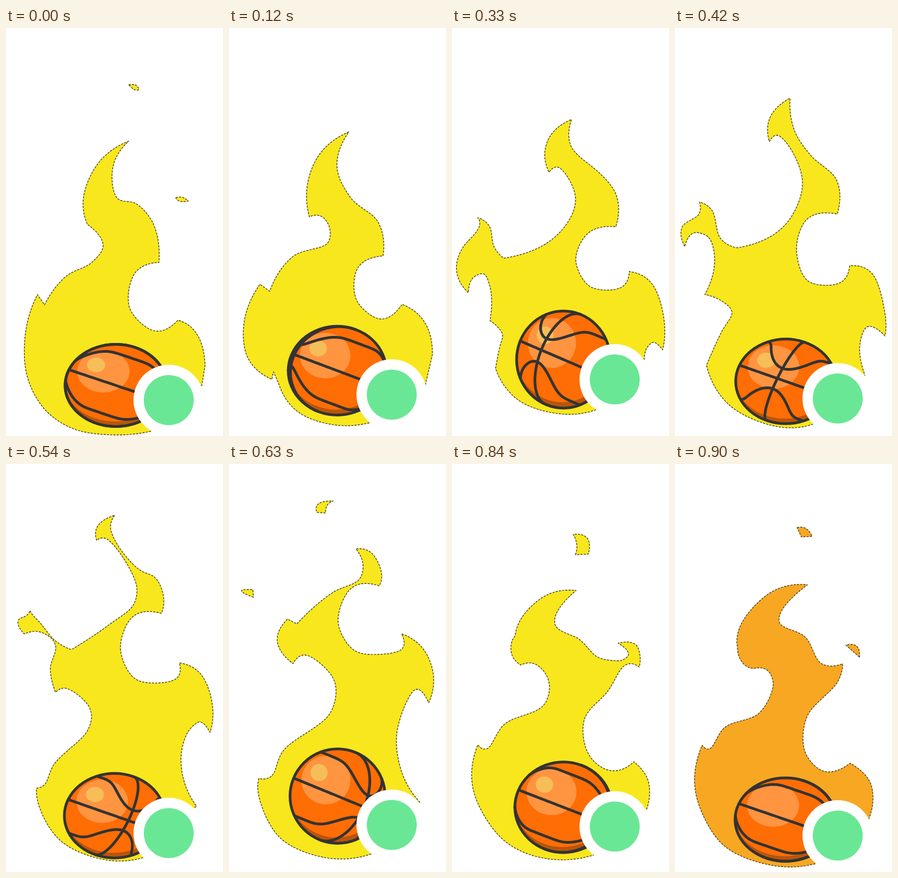
An HTML page with a canvas that plays this animation: 400 px wide and 750 px high, repeating every 0.93 s.

```html
<!DOCTYPE html>
<html lang="en">
<head>
<meta charset="utf-8">
<title>Flaming basketball</title>
<style>
  html, body { margin: 0; width: 100%; height: 100%; overflow: hidden; background: #fff; }
  canvas { display: block; }
</style>
</head>
<body>
<canvas id="stage" width="400" height="750"></canvas>
<script>
const LOOP = 930, STEP = 30, BOUNCE = LOOP / 2, SAMPLES = 64;
const { sin, cos, PI, hypot, sqrt, max } = Math;
const ctx = document.getElementById('stage').getContext('2d');
const mix = (a, b, u) => a + (b - a) * u;

// Key poses of the flame, clockwise from the disc. "/" is a sharp corner,
// an empty run a corner not yet grown, "( )" a part that tears off.
// drift: [x, y, final scale, lifetime] of the loose parts after the pose.
const poses = [
  { at: 0, drift: [0, -4, 0, 75],
    drops: ['226 104 / 238 104 / 245 113 235 113 / 226 104', '313 312 / 324 311 336 318 / 319 318 313 312'],
    flame: `268 741 / 200 748 125 737 72 702 / / / 39 640 36 560 58 490 / 71 509 /
      110 457 158 431 179 400 150 361 / 143 310 172 246 226 208 /
      197 256 205 313 240 323 272 361 282 431 / 238 450 228 515 275 557 317 537 /
      350 560 367 620 / 361 657 /` },
  { at: 120,
    flame: `258 726 / 190 729 125 704 92 655 / 82 632 / 79 646 / 35 607 28 540 57 471 / 75 484 /
      118 420 182 395 185 366 170 346 148 347 / 145 285 170 228 221 191 /
      199 255 225 313 275 357 284 419 / 238 440 235 500 280 535 319 508 /
      360 540 375 600 / 362 656 /` },
  { at: 270,
    flame: `268 686 / 200 694 135 677 95 630 / 80 570 / 67 510 55 493 42 507 38 543 /
      8 500 14 437 54 384 49 368 / 69 383 73 410 82 436 /
      190 397 226 345 200 295 182 303 / 171 262 185 222 226 194 /
      220 240 280 282 307 330 304 381 / 255 395 231 440 260 482 318 482 330 455 /
      370 480 394 545 389 609 / 372 587 357 594 /` },
  { at: 420,
    flame: `258 727 / 190 733 100 693 58 620 / 85 560 105 522 88 503 55 490 /
      73 430 62 385 34 377 18 402 / 13 366 44 342 45 320 / 68 335 84 387 115 404 /
      200 365 235 290 215 225 188 197 174 209 / 175 165 212 129 /
      220 188 250 234 298 280 299 342 / 245 350 224 405 245 465 305 468 322 437 /
      362 450 387 525 387 566 / 355 549 341 580 350 638 /` },
  { at: 630, drift: [4, -30, 0, 90],
    flame: `262 717 / 180 724 95 688 56 615 55 578 / 78 574 100 527 187 457 194 398 140 351 118 367 /
      89 325 108 285 ( 45 245 / 23 233 44 231 / 45 245 ) 108 285 125 294 /
      190 237 240 212 247 185 234 156 ( 178 90 162 89 / 163 75 192 68 / 181 76 178 90 )
      234 156 262 163 281 200 277 224 / 227 227 201 290 230 342 275 350 320 339 318 312 /
      358 340 377 390 368 439 / 345 414 310 490 318 565 352 622 /` },
  { at: 750, drift: [-1, -53, 0.45, 150],
    flame: `268 694 / 165 708 95 670 40 590 44 515 / 65 524 105 468 187 423 183 382 125 351 99 360 /
      86 322 104 287 / 120 297 /
      155 256 206 248 ( 223 206 227 180 217 150 / 255 160 259 204 / 223 206 )
      206 248 183 292 200 318 260 334 295 357 304 340 293 324 / 345 328 357 365 353 400 /
      345 376 308 379 292 418 248 470 275 542 325 561 354 543 / 363 580 361 608` },
  { at: 900, drops: ['225 117 / 240 118 253 133 / 233 134 / 225 117'],
    flame: `258 735 / 180 738 92 703 48 637 36 580 50 517 / 63 524 92 484 155 458 181 405 170 379 145 376 /
      128 369 116 348 / 114 328 / 126 287 182 233 244 222 /
      192 290 240 318 270 367 309 367 ( 340 355 315 333 / 335 335 340 355 / )
      309 367 300 400 243 465 240 530 275 565 323 550 / 358 582 365 615 357 653` }
];

// Spline through the points with parabolic ends, resampled at even distances.
function resample(pts) {
  const last = pts.length - 1;
  if (!last) return Array(SAMPLES).fill(pts[0]);
  const h = [], slope = [], m = [];
  for (let i = 0; i < last; i++) {
    const dx = pts[i + 1][0] - pts[i][0], dy = pts[i + 1][1] - pts[i][1];
    h[i] = sqrt(hypot(dx, dy));
    slope[i] = [dx / h[i], dy / h[i]];
  }
  for (let i = 1; i < last; i++)
    m[i] = slope[i].map((s, j) => mix(slope[i - 1][j], s, h[i - 1] / (h[i - 1] + h[i])));
  const end = (s, next) => s.map((v, j) => next ? 2 * v - next[j] : v);
  m[last] = end(slope[last - 1], m[last - 1]);
  m[0] = end(slope[0], last > 1 && m[1]);

  const dense = [pts[0]], dist = [0];
  for (let i = 0; i < last; i++) {
    for (let k = 1; k <= 16; k++) {
      const u = k / 16, v = 1 - u;
      const p = [0, 1].map(j => v * v * (1 + 2 * u) * pts[i][j] + u * u * (1 + 2 * v) * pts[i + 1][j] +
        h[i] * u * v * (v * m[i][j] - u * m[i + 1][j]));
      const q = dense[dense.length - 1];
      dist.push(dist[dist.length - 1] + hypot(p[0] - q[0], p[1] - q[1]));
      dense.push(p);
    }
  }
  const total = dist[dist.length - 1];
  let i = 0;
  return Array.from({ length: SAMPLES }, (_, n) => {
    const s = total * n / (SAMPLES - 1);
    while (i < dist.length - 2 && dist[i + 1] < s) i++;
    const u = (s - dist[i]) / (dist[i + 1] - dist[i] || 1);
    return dense[i].map((v, j) => mix(v, dense[i + 1][j], u));
  });
}

function outline(text) {
  let pts = [];
  return text.split('/').flatMap(run => {
    pts = pts.slice(-1);
    for (const [, x, y] of run.matchAll(/(\d+)\s+(\d+)/g)) {
      const q = pts[pts.length - 1];
      if (!q || q[0] != x || q[1] != y) pts.push([+x, +y]);
    }
    return resample(pts);
  });
}

// Rises from 0 to 1 and back in one bounce; skew above 1 delays the top.
const hump = (t, skew) => (1 - cos(2 * PI * (t % BOUNCE / BOUNCE) ** skew)) / 2;

function ballAt(t) {
  const stretch = hump(t, 1.2);
  return {
    x: 202.5 - 3 * sin(2 * PI * t / BOUNCE),
    y: 657 - 67 * hump(t, 1.12),
    rx: 93.5 - 9.5 * stretch,
    ry: 75.5 + 18 * stretch
  };
}

function discAt(t) {
  const a = 2 * PI * t / BOUNCE;
  return 663 + 22.5 * cos(a) + 10 * sin(a) - 1.5 * cos(2 * a) - 6.1 * sin(2 * a);
}

for (const p of poses) {
  const hub = `300 ${Math.round(discAt(p.at))}`;
  const body = text => outline(`${hub} / ${text} / ${hub}`);
  const torn = [...p.flame.matchAll(/\(([^)]*)\)/g)].map(m => m[1]);
  p.loose = [...(p.drops || []), ...torn].map(outline);
  p.whole = body(p.flame.replace(/[()]/g, ' '));
  p.main = body(p.flame.replace(/\([^)]*\)/g, '/'));
}

function blob(pts, color) {
  ctx.beginPath();
  pts.forEach(([x, y]) => ctx.lineTo(x, y));
  ctx.closePath();
  ctx.fillStyle = color;
  ctx.fill();
  ctx.strokeStyle = '#4a4010';
  ctx.lineWidth = 1.4;
  ctx.setLineDash([4, 2]);
  ctx.stroke();
  ctx.setLineDash([]);
}

function drawFlame(t) {
  const i = poses.findLastIndex(p => p.at <= t);
  const pose = poses[i], next = poses[i + 1], age = t - pose.at;
  const color = next ? '#f8e71c' : '#f8a723';
  const u = next ? age / (next.at - pose.at) : 0;
  blob(pose.main.map((p, k) => next ? p.map((v, j) => mix(v, next.whole[k][j], u)) : p), color);

  const [dx, dy, size, life] = pose.drift || [0, 0, 1, LOOP];
  if (age >= life) return;
  const w = age / life, scale = mix(1, size, w), move = [dx * w, dy * w];
  for (const drop of pose.loose) {
    const mid = [0, 1].map(j => drop.reduce((s, p) => s + p[j], 0) / drop.length);
    blob(drop.map(p => p.map((v, j) => mix(mid[j], v, scale) + move[j])), color);
  }
}

function oval(x, y, rx, ry, color) {
  ctx.beginPath();
  ctx.ellipse(x, y, rx, ry, 0, 0, PI * 2);
  ctx.fillStyle = color;
  ctx.fill();
}

function drawBall(t) {
  const { x: cx, y: cy, rx, ry } = ballAt(t);
  const rad = PI / 180, turn = t / LOOP;
  const spin = -90 + 180 * turn - 6 * sin(2 * PI * turn);
  const tc = cos(22.5 * rad), ts = sin(22.5 * rad);
  const part = (x, y, r, color) => oval(cx + x * rx, cy + y * ry, r * rx, r * ry, color);

  part(0, 0, 1, '#b9550b');
  ctx.save();
  ctx.clip();
  part(-0.02, -0.14, 1.02, '#ff6d05');
  ctx.restore();
  part(-0.245, -0.34, 0.515, '#ff9441');
  if (t < 900) part(-0.39, -0.5, 0.18, '#f6bd58');

  ctx.strokeStyle = '#333';
  ctx.lineWidth = 5;
  ctx.lineJoin = 'round';

  // Strokes the near side of a curve on the tilted sphere.
  const seam = place => {
    let pen = false;
    ctx.beginPath();
    for (let a = 0; a <= 360; a += 3) {
      const [lat, lon] = place(a + spin + 90).map(v => v * rad);
      const x = cos(lat) * sin(lon), y = -sin(lat);
      const near = cos(lat) * cos(lon) >= -0.01;
      const px = cx + (x * tc - y * ts) * rx, py = cy + (x * ts + y * tc) * ry;
      if (near) pen ? ctx.lineTo(px, py) : ctx.moveTo(px, py);
      pen = near;
    }
    ctx.stroke();
  };
  const bend = a => 47 - 32 * cos((a - spin) * rad) ** 6;
  seam(a => [0, a]);
  seam(a => [bend(a), a]);
  seam(a => [-bend(a), a]);
  seam(a => [a, spin]);

  ctx.beginPath();
  ctx.ellipse(cx, cy, rx, ry, 0, 0, PI * 2);
  ctx.stroke();
}

function draw(t) {
  ctx.fillStyle = '#fff';
  ctx.fillRect(0, 0, 400, 750);
  drawFlame(t);
  drawBall(t);
  const y = discAt(t);
  oval(300, y, 65, 65, '#fff');
  oval(300, y, 46, 46, '#6ae795');
}

const start = performance.now();
function tick() {
  const t = max(0, performance.now() - start) % LOOP;
  draw(Math.floor(t / STEP) * STEP);
  requestAnimationFrame(tick);
}
tick();
</script>
</body>
</html>
```
